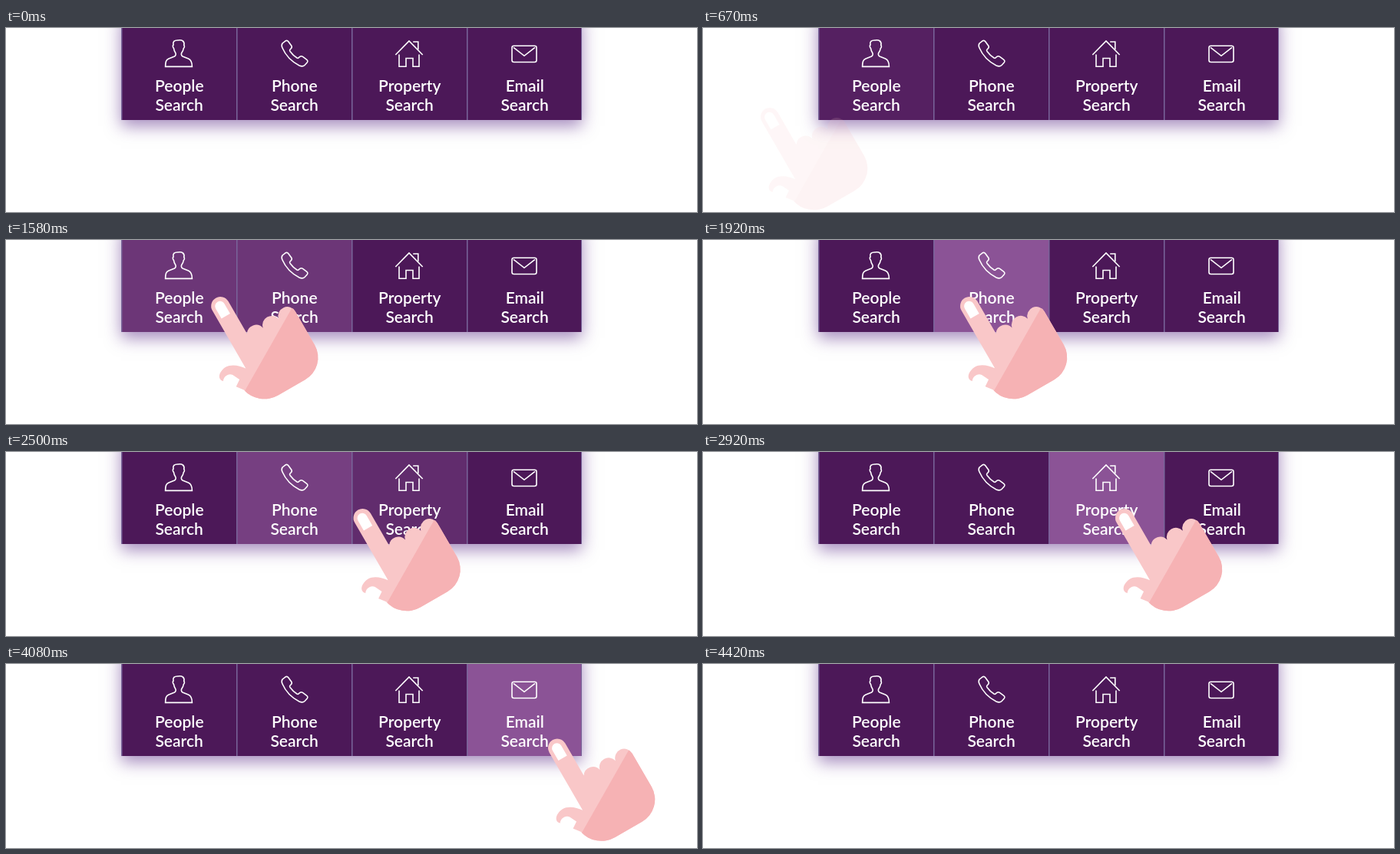
Animation, 900 px wide and 240 px high, one loop 5330 ms. Source, as an HTML page with a canvas:

```html
<!DOCTYPE html>
<html lang="en">
<head>
<meta charset="utf-8">
<title>Search menu</title>
<style>
html, body { margin: 0; width: 900px; height: 240px; overflow: hidden; background: #fff; }
canvas { display: block; }
</style>
</head>
<body>
<canvas id="stage" width="900" height="240"></canvas>
<script>
const LOOP = 5330, STEP = 1000 / 12;
const BASE = [76, 24, 88], LIT = [139, 83, 150];
const ctx = document.getElementById('stage').getContext('2d');
const layer = document.createElement('canvas');
layer.width = 900;
layer.height = 240;
const hctx = layer.getContext('2d');

const cells = [
  { label: 'People', icon: 'M207.6 50.4C207.6 44 208.5 41.5 212 40L219.5 37C221.5 36 221.5 33.5 220.5 32C219 30 218.8 28.5 218.5 26.5C217 25.5 217 22.5 218 22C217 18 219 15.8 224 16C229.5 15 233 17.5 231.8 22.5C232.8 23 232.5 25.5 231.3 26.5C231 28.5 230.5 30 229 32C228 33.5 228 36 230 37L237.5 40C241 41.5 242.4 44 242.4 50.4Z' },
  { label: 'Phone', icon: 'M360 20L364 16.8Q366.3 15.6 368 18L371.8 23.2Q373 25.2 371.2 26.8L370 28Q369 29 370 30.5Q374 36 379 39Q380.5 39.8 381.5 38.5L382.5 37.6Q384.5 36 386.5 37.4L391.5 41.2Q394 43 392 45.2L389 48.5Q386.5 51 382 49Q366.5 41 360 26Q358.3 22.5 360 20Z' },
  { label: 'Property', icon: 'M507.3 35L525 17L542.7 35M530.2 18H536.8V28M512 34.5V50.3H521V39.5H530V50.3H538V34.5' },
  { label: 'Email', icon: 'M661.5 23.3H688.5Q691 23.3 691 25.8V42Q691 44.5 688.5 44.5H661.5Q659 44.5 659 42V25.8Q659 23.3 661.5 23.3ZM661 25.3L675 36.3L689 25.3' }
].map(c => ({ label: c.label, icon: new Path2D(c.icon) }));

// Upright hand, origin at the centre of the fingertip
const hand = new Path2D('M-12 0A12 12 0 0 1 12 0L12 48.4A12 12 0 0 1 33.75 52.5A12 12 0 0 1 57.25 52.5A12 12 0 0 1 81 55L81 105.5A33.3 33.3 0 0 1 47.5 138.5L7 138.5A36 36 0 0 1 -28.2 110L-47.6 84.5C-50 78 -42 73 -34 72.5C-25 72.5 -17 80 -12 87Z');
const shade = new Path2D('M100 36.8L-40 119V150H100Z');
const nails = new Path2D('M-7 0A6.5 6.5 0 0 1 6 0V15H-7ZM-46.5 88C-43 81 -34 81 -31 86L-26.3 95.6L-38 103.5Z');

// step, x, y of the fingertip
const track = [
  [8, 87, 116], [10, 109, 100.5], [13, 164, 88.5], [14, 187, 87.2],
  [16, 227, 86.3], [23, 347, 86], [30, 464.5, 86], [35, 549, 86],
  [42, 648, 88.8], [43, 658, 90.5], [49, 718, 109.5], [53, 740, 120]
];

const ramp = (k, a, b) => Math.min(1, Math.max(0, (k - a) / (b - a)));

function slope(i, d) {
  const a = track[Math.max(0, i - 1)], b = track[Math.min(track.length - 1, i + 1)];
  return (b[d] - a[d]) / (b[0] - a[0]);
}

function along(k, d) {
  let i = 0;
  while (i < track.length - 2 && k >= track[i + 1][0]) i++;
  const a = track[i], b = track[i + 1], w = b[0] - a[0];
  const s = (k - a[0]) / w, s2 = s * s, s3 = s2 * s;
  return (2 * s3 - 3 * s2 + 1) * a[d] + (s3 - 2 * s2 + s) * w * slope(i, d)
    + (3 * s2 - 2 * s3) * b[d] + (s3 - s2) * w * slope(i + 1, d);
}

function drawPanel(k) {
  const edges = [ramp(k, 7, 14), ramp(k, 16, 22), ramp(k, 28, 34), ramp(k, 36, 42), ramp(k, 49, 53)];
  ctx.save();
  ctx.shadowColor = 'rgba(76,24,125,.5)';
  ctx.shadowBlur = 20;
  ctx.shadowOffsetY = 8;
  ctx.fillStyle = `rgb(${BASE})`;
  ctx.fillRect(150, -20, 600, 140);
  ctx.restore();

  ctx.textAlign = 'center';
  ctx.font = '600 21px Lato, sans-serif';
  ctx.lineWidth = 1.6;
  ctx.strokeStyle = '#fff';
  cells.forEach((c, i) => {
    const x = 150 + 150 * i, lit = edges[i] - edges[i + 1];
    ctx.fillStyle = `rgb(${BASE.map((v, n) => Math.round(v + (LIT[n] - v) * lit))})`;
    ctx.fillRect(x, 0, 150, 120);
    ctx.fillStyle = '#fff';
    ctx.fillText(c.label, x + 75.8, 82.5);
    ctx.fillText('Search', x + 75.6, 108);
    ctx.stroke(c.icon);
  });
  ctx.fillStyle = '#79659a';
  for (let x = 150; x < 750; x += 150) ctx.fillRect(x, 0, 1.5, 120);
  ctx.fillRect(749, 0, 1, 120);
}

function drawHand(k) {
  const alpha = ramp(k, 7, 14) - ramp(k, 49, 53);
  if (alpha <= 0) return;
  hctx.clearRect(0, 0, 900, 240);
  hctx.save();
  hctx.translate(along(k, 1), along(k, 2));
  hctx.rotate(-Math.PI / 6);
  hctx.fillStyle = '#f9c7c8';
  hctx.fill(hand);
  hctx.fillStyle = '#fff';
  hctx.fill(nails);
  hctx.clip(hand);
  hctx.fillStyle = '#f6b2b4';
  hctx.fill(shade);
  hctx.restore();
  ctx.globalAlpha = alpha;
  ctx.drawImage(layer, 0, 0);
  ctx.globalAlpha = 1;
}

function draw(t) {
  const k = Math.floor((t % LOOP + 4) / STEP);
  ctx.fillStyle = '#fff';
  ctx.fillRect(0, 0, 900, 240);
  drawPanel(k);
  drawHand(k);
}

const start = performance.now();
function tick() {
  draw(performance.now() - start);
  requestAnimationFrame(tick);
}
tick();
</script>
</body>
</html>
```
